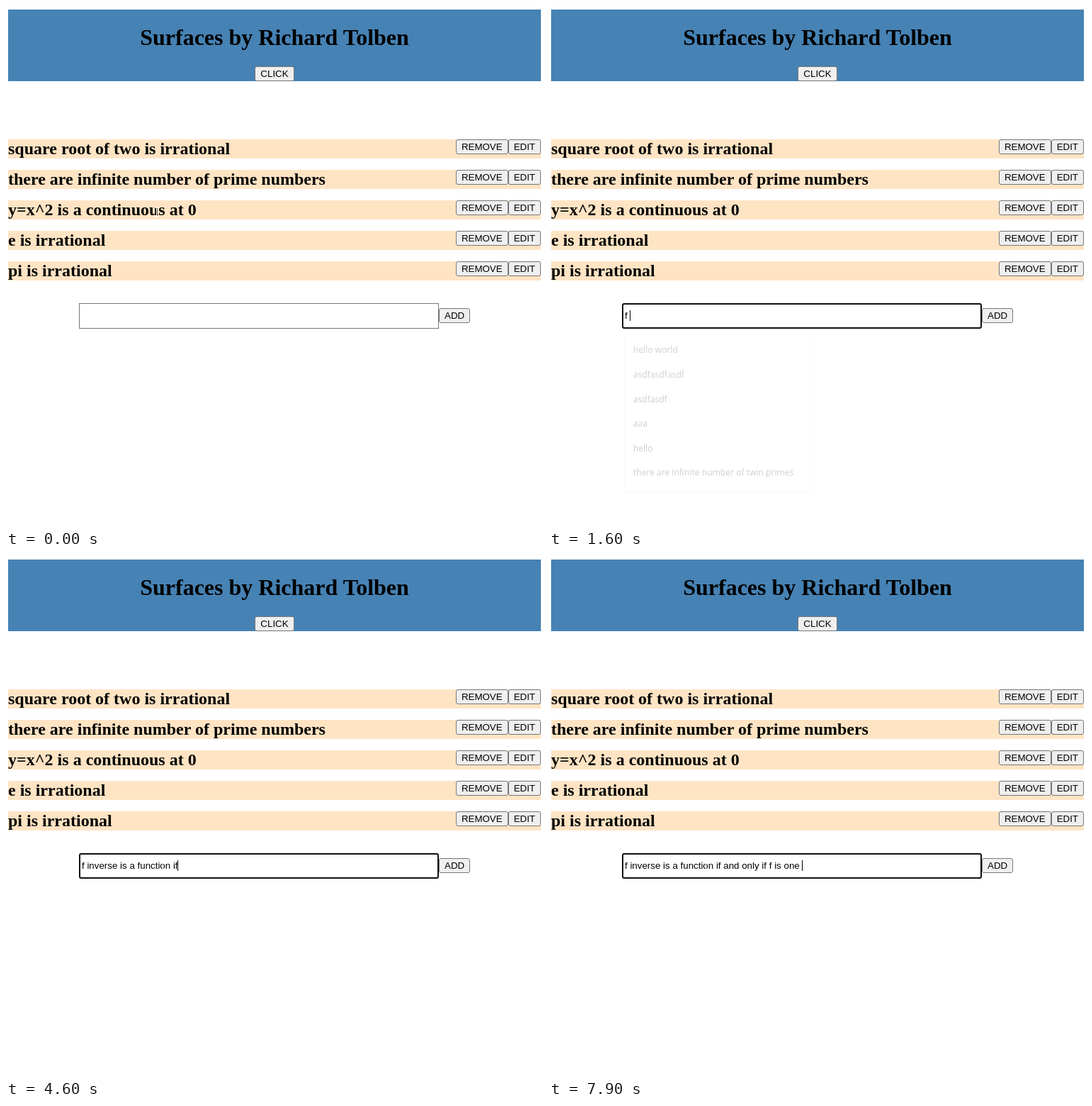
Recreate the animation shown at these times as an HTML page. Size 758 by 736 pixels, loop 8000 ms.

```html
<!DOCTYPE html>
<html lang="en">
<head>
<meta charset="utf-8">
<title>Statement list</title>
<style>
  html, body { margin: 0; width: 100%; height: 100%; overflow: hidden; background: #fff; }
  body { position: relative; font-family: "Liberation Serif", serif; color: #000; }
  header, .row, .field, .popup, .caret, .pointer, .typed, #add, #click { position: absolute; box-sizing: border-box; }
  header { left: 3px; top: 5px; width: 752px; height: 101px; background: #4682b4; text-align: center; }
  h1 { margin: 21px 0 0; font: bold 32px/37px "Liberation Serif", serif; }
  .row { left: 3px; width: 752px; height: 27px; background: #ffe4c4; display: flex; align-items: flex-start; }
  h2 { margin: 0; flex: 1; font: bold 24px/27px "Liberation Serif", serif; }
  .button {
    box-sizing: border-box; height: 21px; padding: 2px 7px; white-space: nowrap;
    border: 1px solid #767676; border-radius: 3px; background: #efefef;
    font: 13.333px/15px "Liberation Sans", sans-serif;
  }
  #click { left: 351.35px; top: 85px; }
  #add { left: 611px; top: 426px; }
  .field { left: 103px; top: 419px; width: 508px; height: 36px; border: 1px solid #767676; }
  .field.focused { border: 2px solid #101010; border-radius: 3px; }
  .typed { left: 107px; top: 429px; white-space: pre; font: 13.333px/15px "Liberation Sans", sans-serif; }
  .caret { top: 429px; width: 1px; height: 15px; background: #000; }
  .popup {
    left: 102px; top: 459px; width: 276px; height: 229px; padding: 5px 12px;
    background: #fff; border-radius: 4px; box-shadow: 0 1px 3px rgba(0, 0, 0, .28);
    font: 12.6px/36px "Open Sans", sans-serif; color: #1a1a1a; white-space: nowrap;
  }
  .pointer { width: 1px; height: 14px; background: #fff; }
  .pointer::before, .pointer::after { content: ""; position: absolute; left: -2px; width: 5px; height: 1px; background: #fff; }
  .pointer::after { bottom: 0; }
</style>
</head>
<body>
<header><h1>Surfaces by Richard Tolben</h1></header>
<div class="button" id="click">CLICK</div>
<div class="field"></div>
<div class="typed"></div>
<div class="caret"></div>
<div class="button" id="add">ADD</div>
<div class="popup"></div>
<script>
  const LOOP = 8000, TICK = 100, FOCUS = 300, OPEN = 500;
  const statements = [
    "square root of two is irrational",
    "there are infinite number of prime numbers",
    "y=x^2 is a continuous at 0",
    "e is irrational",
    "pi is irrational"
  ];
  const suggestions = ["hello world", "asdfasdfasdf", "asdfasdf", "aaa", "hello",
    "there are infinite number of twin primes"];

  // One key per tick: "_" waits, "<" deletes a letter, "^" deletes a word.
  const typing = [
    [1500, "f i_n_ve"],
    [2300, "rs__ <e is a func"],
    [4000, "t"],
    [4000, "ion_ if and only if f is one to one"],
    [7500, "^<_<<"]
  ];
  // Popup closing: time, opacity, scale.
  const closing = [[OPEN, 1, 1], [1500, .6, .985], [1600, .2, .962], [1700, 0, .95]];

  const find = selector => document.querySelector(selector);
  const add = (parent, className, text = "", tag = "div") => {
    const node = parent.appendChild(document.createElement(tag));
    node.className = className;
    node.textContent = text;
    return node;
  };

  statements.forEach((text, i) => {
    const row = add(document.body, "row");
    row.style.top = 188 + 43 * i + "px";
    add(row, "", text, "h2");
    add(row, "button", "REMOVE");
    add(row, "button", "EDIT");
  });

  const field = find(".field"), typed = find(".typed"), caret = find(".caret"), popup = find(".popup");
  const pointer = add(document.body, "pointer");
  suggestions.forEach(text => add(popup, "", text));

  function press(text, key) {
    if (key === "_") return text;
    if (key === "<") return text.slice(0, -1);
    if (key === "^") return text.replace(/\w+$/, "");
    return text + key;
  }

  function textAt(time) {
    let text = "";
    for (const [start, keys] of typing) {
      const count = Math.max(0, Math.floor((time - start) / TICK) + 1);
      text = [...keys.slice(0, count)].reduce(press, text);
    }
    return text;
  }

  function draw(time) {
    const focused = time >= FOCUS;
    field.classList.toggle("focused", focused);
    typed.textContent = textAt(time);
    caret.style.visibility = focused ? "visible" : "hidden";
    caret.style.left = 107 + Math.floor(typed.getBoundingClientRect().width) + "px";

    const [, opacity, scale] = closing.filter(step => step[0] <= time).pop() || [0, 0, 1];
    popup.style.opacity = opacity;
    popup.style.transform = `scale(${scale})`;

    const travel = Math.min(1, time / FOCUS);
    pointer.style.left = Math.round(212 + 9 * travel) + "px";
    pointer.style.top = Math.round(284 + 146 * travel) + "px";
  }

  const began = performance.now();
  function frame() {
    const time = (performance.now() - began) % LOOP;
    draw(Math.floor(time / TICK) * TICK);
    requestAnimationFrame(frame);
  }
  frame();
</script>
</body>
</html>
```
